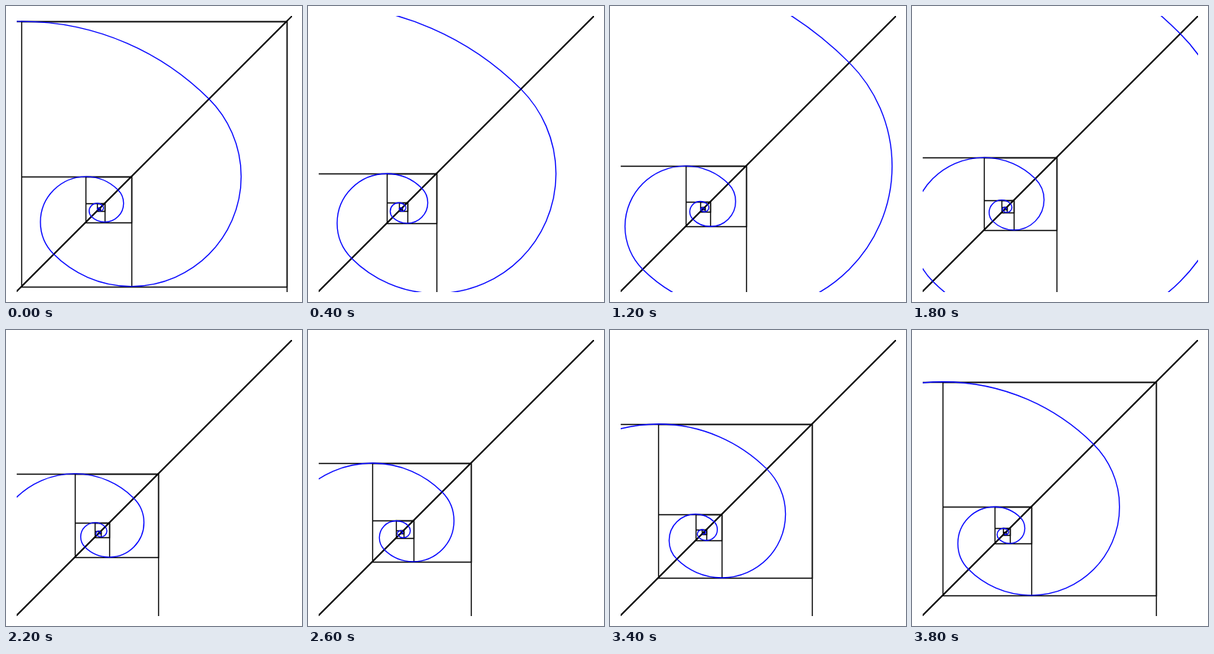
Write an HTML page with a canvas that moves like this. It is 387 px wide and 387 px high and loops after 4 s.

```html
<!DOCTYPE html>
<html lang="en">
<head>
<meta charset="utf-8">
<title>Silver spiral zoom</title>
<style>
  html, body { margin: 0; width: 100%; height: 100%; overflow: hidden; background: #fff; }
  canvas { display: block; }
</style>
</head>
<body>
<canvas width="387" height="387"></canvas>
<script>
const ctx = document.querySelector('canvas').getContext('2d');
const LOOP = 4000, STEP = 200;
const RATIO = 1 + Math.SQRT2;         // size ratio of neighbouring squares
const NEAR = 1 / (RATIO + 1);         // share of a square's diagonal before the pole
const POLE = { x: 121.88, y: 265.12 };
const START = 346.5 / RATIO ** 2;

const snap = v => Math.round(v) + 0.5;
// point on the rising diagonal, d pixels right of the pole
const onDiagonal = d => ({ x: POLE.x + d, y: POLE.y - d });

function drawSquare({ near, far, sign }) {
  const x = snap(near.x), y = snap(near.y);
  const farX = snap(far.x), farY = snap(far.y);
  ctx.beginPath();
  if (sign > 0) {
    ctx.rect(x, y, farX - x, farY - y);
  } else {
    // the other two sides lie on the enclosing square
    ctx.moveTo(farX, y);
    ctx.lineTo(x, y);
    ctx.lineTo(x, farY);
  }
  ctx.stroke();
  ctx.beginPath();
  ctx.moveTo(near.x, near.y);
  ctx.lineTo(far.x, far.y);
  ctx.stroke();
}

function drawArc({ near, size, sign }) {
  const from = Math.PI * (sign > 0 ? 0.75 : 1.75);
  ctx.beginPath();
  ctx.arc(near.x, near.y, size, from, from + Math.PI);
  ctx.stroke();
}

function draw(time) {
  const progress = Math.floor(time % LOOP / STEP) * STEP / LOOP;
  // the visible width shrinks linearly
  const base = START / (1 - progress * (1 - RATIO ** -2));
  const squares = [];
  for (let level = 5; level >= -5; level--) {
    const size = base * RATIO ** level;
    const sign = level % 2 ? -1 : 1;
    squares.push({
      size, sign,
      near: onDiagonal(-sign * size * NEAR),
      far: onDiagonal(sign * size * (1 - NEAR))
    });
  }

  ctx.fillStyle = '#fff';
  ctx.fillRect(0, 0, 387, 387);
  ctx.save();
  ctx.beginPath();
  ctx.rect(14, 13, 360, 361);
  ctx.clip();
  ctx.lineWidth = 1.39;
  ctx.strokeStyle = '#000';
  squares.forEach(drawSquare);
  ctx.strokeStyle = '#00f';
  squares.forEach(drawArc);
  ctx.restore();
}

const begin = performance.now();
function tick() {
  draw(performance.now() - begin);
  requestAnimationFrame(tick);
}
tick();
</script>
</body>
</html>
```
